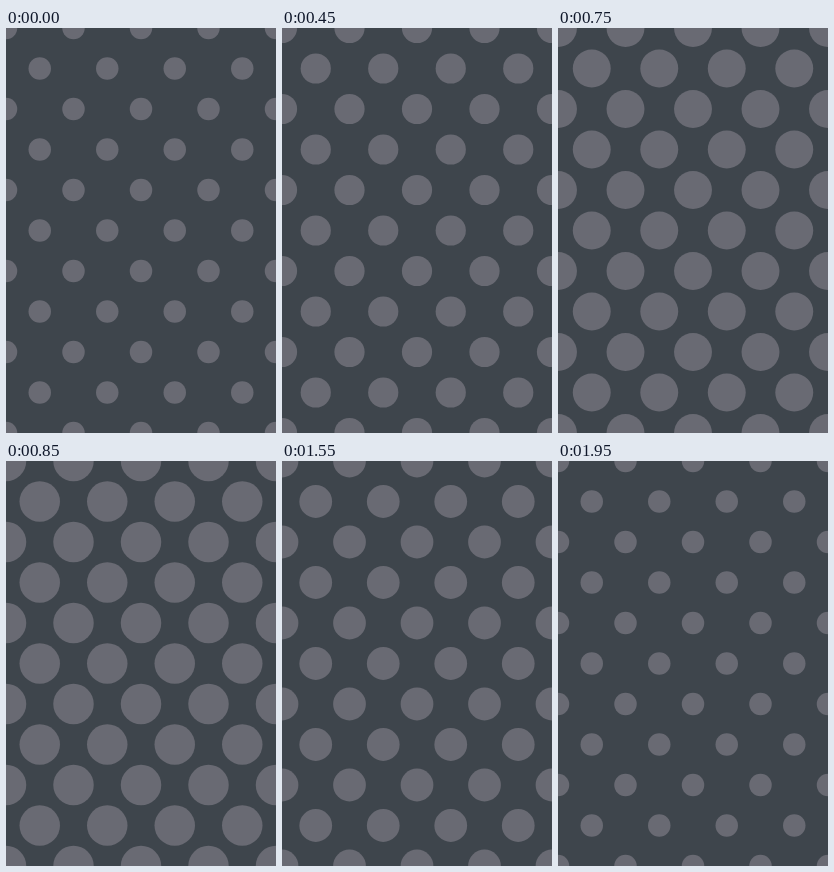
An HTML page with a canvas for the animation above (2200 ms loop, 270 px wide and 405 px high).

```html
<!DOCTYPE html>
<html lang="en">
<head>
<meta charset="utf-8">
<title>Breathing dots</title>
<style>
  html, body { margin: 0; width: 100%; height: 100%; overflow: hidden; background: #3e454c; }
  canvas { display: block; }
</style>
</head>
<body>
<canvas id="stage" width="270" height="405"></canvas>
<script>
const ctx = document.getElementById('stage').getContext('2d');
const WIDTH = 270, HEIGHT = 405, LOOP = 2200;
const GAP_X = WIDTH / 4, GAP_Y = HEIGHT / 10;
const SMALL = 11.25, LARGE = 20.25, STEPS = 7, STEP_MS = 100;

// Number of completed steps, counted from the given start time.
const stepsSince = (time, start) =>
  Math.max(0, Math.min(STEPS, Math.floor((time - start) / STEP_MS) + 1));

function radiusAt(time) {
  const grown = stepsSince(time, 250) - stepsSince(time, 1350);
  return SMALL + (LARGE - SMALL) * grown / STEPS;
}

function draw(time) {
  const radius = radiusAt(time);
  ctx.fillStyle = '#3e454c';
  ctx.fillRect(0, 0, WIDTH, HEIGHT);
  ctx.fillStyle = '#696a73';
  for (let row = 0; row <= 10; row++) {
    for (let col = 0; col <= 4; col++) {
      ctx.beginPath();
      ctx.arc((col + row % 2 / 2) * GAP_X, row * GAP_Y, radius, 0, 2 * Math.PI);
      ctx.fill();
    }
  }
}

const start = performance.now();
function tick() {
  draw((performance.now() - start) % LOOP);
  requestAnimationFrame(tick);
}
tick();
</script>
</body>
</html>
```
